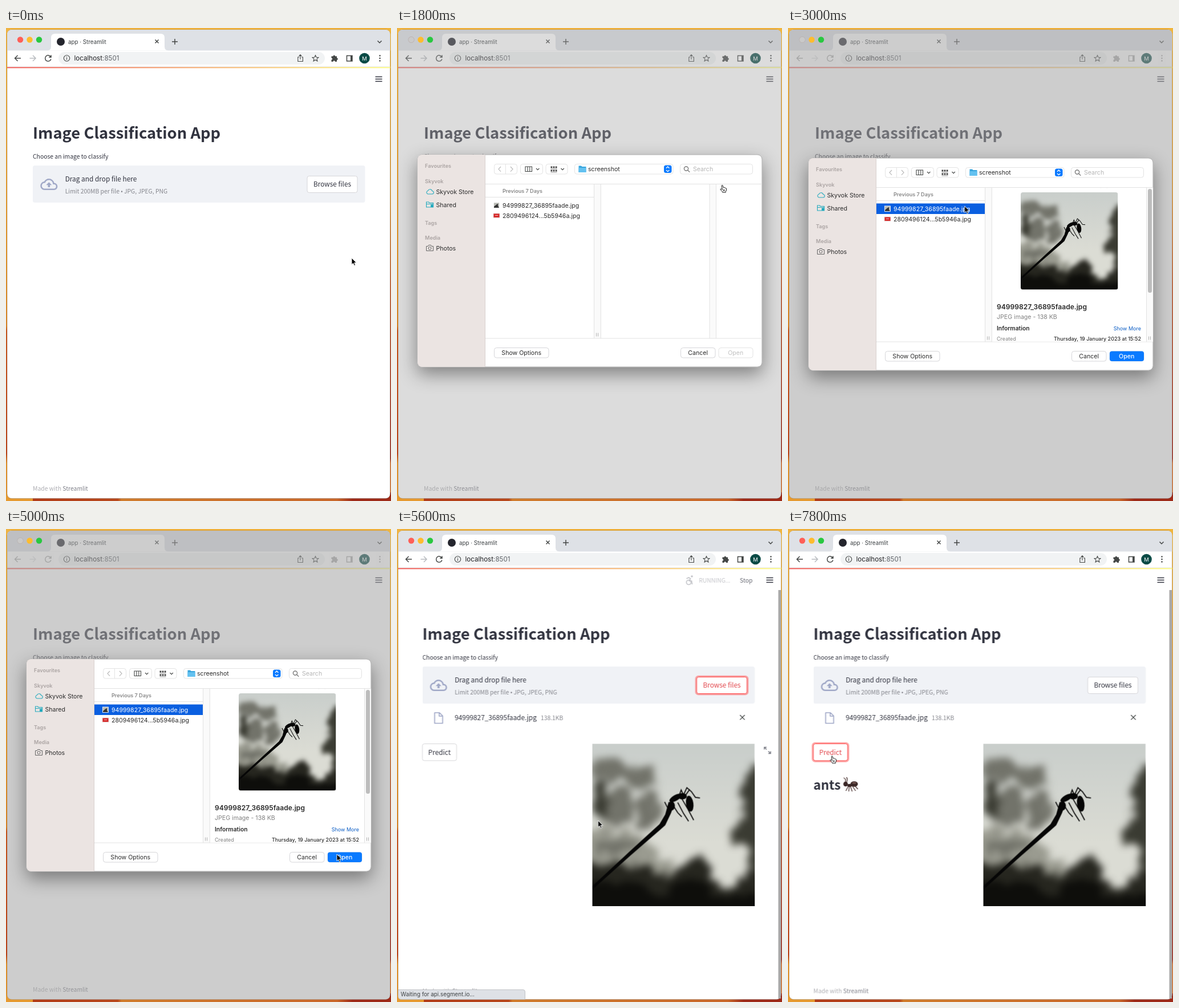
An HTML page that plays this animation: 675x829 px, repeating every 8000 ms.

```html
<!DOCTYPE html>
<html lang="en">
<head>
<meta charset="utf-8">
<title>Image Classification App</title>
<style>
html, body { margin: 0; width: 100%; height: 100%; overflow: hidden; }
svg.stage { display: block; width: 675px; height: 829px; }
text { font: 10.6px Inter, sans-serif; fill: #2b2b2b; }
.page text { font: 11.83px "Noto Sans CJK JP", "Noto Sans CJK SC", "Noto Sans CJK", sans-serif; fill: #31333f; }
.page .small { font-size: 10.35px; }
.page .grey { fill: #84858c; }
.page .pale { fill: #adadb2; }
.page .title { font-size: 27.35px; font-weight: 700; }
.page .result { font-size: 22.4px; font-weight: 700; }
.mid { text-anchor: middle; }
.end { text-anchor: end; }
.line { fill: none; stroke: #444746; stroke-width: 1.5; }
.btn { fill: #fff; stroke: #d6d6d9; }
.red .btn { stroke: #ff4b4b; }
.page .red text { fill: #e2444a; }
.ring { fill: none; stroke: #ff4b4b; stroke-opacity: .5; stroke-width: 2.6; }
.head { font-size: 9.1px; font-weight: 600; fill: #aaa3a2; }
.tiny { font-size: 9px; }
.box { fill: #fff; stroke: #dcdcdc; stroke-width: .8; }
.rule { stroke: #e2e2e2; fill: none; }
.teal { fill: none; stroke: #22a9bd; stroke-width: 1.1; }

/* 2.5% is one 200 ms step */
.dim, .dim2, .dialog, .preview, .uploaded, .expand, .hover, .focus, .predict-hover, .predict-focus,
.running, .status, .ants, .hand { opacity: 0; }
.dim, .dim2, .dialog, .sheet, .preview, .page, .uploaded, .expand, .footer, .hover, .focus, .predict-hover,
.predict-focus, .running, .status, .ants, .hand, .arrow, .cursor { animation: 8s step-end infinite; }
.dim { animation-name: dim; }
.dim2 { animation-name: dim2; }
.dialog { animation-name: dialog; }
.sheet { animation-name: sheet; }
.preview { animation-name: preview; }
.page { animation-name: page; }
.uploaded { animation-name: uploaded; }
.expand { animation-name: expand; }
.footer { animation-name: footer; }
.hover { animation-name: hover; }
.focus { animation-name: focus; }
.predict-hover { animation-name: predict-hover; }
.predict-focus { animation-name: predict-focus; }
.running { animation-name: running; }
.status { animation-name: status; }
.ants { animation-name: ants; }
.hand { animation-name: hand; }
.arrow { animation-name: arrow; }
.cursor { animation-name: cursor; }
@keyframes dim { 22.5% { opacity: 1 } 25% { opacity: 0 } }
@keyframes dim2 { 25% { opacity: 1 } 65% { opacity: 0 } }
@keyframes dialog { 22.5% { opacity: 1 } 65% { opacity: 0 } }
@keyframes sheet { 25% { transform: translate(0, 6px) } 65% { transform: none } }
@keyframes preview { 35% { opacity: 1 } 65% { opacity: 0 } }
@keyframes page { 67.5%, 100% { transform: translate(-2.5px, 0) } }
@keyframes uploaded { 67.5%, 100% { opacity: 1 } }
@keyframes expand { 67.5% { opacity: 1 } 72.5% { opacity: 0 } }
@keyframes footer { 67.5%, 100% { transform: translate(0, 2.5px) } }
@keyframes hover { 12.5% { opacity: 1 } 87.5% { opacity: 0 } }
@keyframes focus { 20% { opacity: 1 } 87.5% { opacity: 0 } }
@keyframes predict-hover { 77.5%, 100% { opacity: 1 } }
@keyframes predict-focus { 87.5%, 100% { opacity: 1 } }
@keyframes running { 67.5% { opacity: 1 } 75% { opacity: 0 } 87.5% { opacity: 1 } 92.5% { opacity: 0 } }
@keyframes status { 67.5% { opacity: 1 } 77.5% { opacity: 0 } }
@keyframes ants { 92.5%, 100% { opacity: 1 } }
@keyframes hand { 12.5% { opacity: 1 } 27.5% { opacity: 0 } 77.5%, 100% { opacity: 1 } }
@keyframes arrow { 12.5% { opacity: 0 } 27.5% { opacity: 1 } 77.5%, 100% { opacity: 0 } }
@keyframes cursor {
  0% { transform: translate(606px, 403px) }
  7.5% { transform: translate(598px, 372px) }
  10% { transform: translate(582px, 315px) }
  12.5% { transform: translate(571px, 278px) }
  15% { transform: translate(570px, 275px) }
  27.5% { transform: translate(530px, 285px) }
  30% { transform: translate(420px, 303px) }
  32.5% { transform: translate(325px, 314px) }
  35% { transform: translate(309.5px, 312px) }
  47.5% { transform: translate(330px, 340px) }
  50% { transform: translate(400px, 420px) }
  52.5% { transform: translate(490px, 510px) }
  55% { transform: translate(555px, 560px) }
  57.5% { transform: translate(580px, 570px) }
  67.5% { transform: translate(480px, 545px) }
  70% { transform: translate(352.5px, 511px) }
  72.5% { transform: translate(230px, 455px) }
  75% { transform: translate(130px, 410px) }
  77.5% { transform: translate(85px, 399px) }
  80%, 100% { transform: translate(77px, 397.5px) }
}
</style>
</head>
<body>
<svg class="stage" viewBox="0 0 675 829">
<defs>
  <linearGradient id="left" x2="0" y2="1">
    <stop stop-color="#efb443"/><stop offset=".46" stop-color="#e89a2c"/><stop offset=".63" stop-color="#e08a28"/>
    <stop offset=".64" stop-color="#cf5a1e"/><stop offset=".9" stop-color="#c2461a"/><stop offset=".92" stop-color="#e8962c"/>
  </linearGradient>
  <linearGradient id="right" x2="0" y2="1">
    <stop stop-color="#f0b63e"/><stop offset=".35" stop-color="#e49a30"/><stop offset=".55" stop-color="#c4511f"/>
    <stop offset=".91" stop-color="#9c2416"/><stop offset=".92" stop-color="#d9702a"/>
  </linearGradient>
  <linearGradient id="bottom">
    <stop offset=".07" stop-color="#e69a30"/><stop offset=".07" stop-color="#b23c18"/><stop offset=".29" stop-color="#b8481c"/>
    <stop offset=".3" stop-color="#d07c2c"/><stop offset=".86" stop-color="#c9672a"/><stop offset=".9" stop-color="#9e2a18"/>
  </linearGradient>
  <linearGradient id="accent"><stop stop-color="#f0524f"/><stop offset="1" stop-color="#fffd80"/></linearGradient>
  <linearGradient id="sky" x2="0" y2="1"><stop stop-color="#c9cecb"/><stop offset=".6" stop-color="#dbdcd4"/></linearGradient>
  <filter id="foliage" x="-20%" y="-20%" width="140%" height="140%" color-interpolation-filters="sRGB">
    <feTurbulence baseFrequency=".03" numOctaves="2" seed="4" result="noise"/>
    <feDisplacementMap in="SourceGraphic" in2="noise" scale="36" xChannelSelector="R" yChannelSelector="G"/>
    <feGaussianBlur stdDeviation="7"/>
  </filter>
  <filter id="shadow" x="-20%" y="-20%" width="140%" height="150%"><feDropShadow dx="0" dy="12" stdDeviation="16" flood-opacity=".42"/></filter>
  <clipPath id="round"><rect x="408" y="282" width="170.5" height="170.5" rx="4"/></clipPath>
  <clipPath id="sheetClip"><rect x="36" y="222" width="604" height="372" rx="8"/></clipPath>
  <symbol id="photo" viewBox="0 0 285 285">
    <rect width="285" height="285" fill="url(#sky)"/>
    <g filter="url(#foliage)">
      <path d="M-30 140L20 150 60 140 90 165 110 190 140 200 150 240H-30Z" fill="#9a9b90"/>
      <g fill="#72736a">
        <ellipse cx="18" cy="35" rx="34" ry="24"/><ellipse cx="75" cy="48" rx="34" ry="22"/>
        <ellipse cx="30" cy="105" rx="34" ry="34"/><ellipse cx="88" cy="108" rx="22" ry="30"/>
        <ellipse cx="30" cy="172" rx="36" ry="14"/>
      </g>
      <g fill="#3a3b32">
        <ellipse cx="276" cy="80" rx="24" ry="54"/><ellipse cx="270" cy="142" rx="30" ry="34"/>
        <ellipse cx="4" cy="92" rx="14" ry="32"/><ellipse cx="280" cy="190" rx="18" ry="30"/>
      </g>
      <path d="M-30 190L35 205 75 205 115 222 142 218 158 200 175 182 190 196 202 222 228 245 246 236 260 214 315 205V315H-30Z" fill="#26261f"/>
      <path d="M-30 238L60 238 120 255 170 225 205 258 315 250V315H-30Z" fill="#0e0e0b"/>
    </g>
    <path d="M0 250L67 187.500 118 141 128 124 134 102 144 106 138 122 128 143 119 151 67 196 0 256Z" fill="#060606"/>
    <g fill="#060606">
      <ellipse cx="146" cy="95" rx="12" ry="5" transform="rotate(-30 146 95)"/>
      <ellipse cx="158" cy="92" rx="8" ry="5.500"/><ellipse cx="171" cy="105" rx="6.500" ry="14" transform="rotate(-8 171 105)"/>
      <ellipse cx="139" cy="109" rx="6" ry="8"/>
    </g>
    <path d="M152 92L156 81 160 90M160 90L166 77 174 84 181 94 189 95M164 90L171 80M132 112L127 102M150 103L160 122 169 136M157 96L168 115 178 134M143 110L150 121 157 128" fill="none" stroke="#060606" stroke-width="1.700"/>
  </symbol>
</defs>

<rect width="675" height="829" fill="#efb240"/>
<rect width="5" height="829" fill="url(#left)"/>
<rect x="668" width="7" height="829" fill="url(#right)"/>
<rect y="814" width="675" height="15" fill="url(#bottom)"/>
<rect x="2" y="3" width="671.5" height="821.5" rx="8" fill="#fff" stroke="#000" stroke-opacity=".2"/>

<!-- browser bar -->
<path d="M2 39.5V11a8 8 0 0 1 8-8H665.5a8 8 0 0 1 8 8V39.5Z" fill="#dee1e6"/>
<path d="M72 39.5q7 0 7-7V17q0-7 7-7H271q7 0 7 7V32.5q0 7 7 7Z" fill="#fff"/>
<circle cx="25" cy="20.5" r="5.2" fill="#ff5f57"/>
<circle cx="96" cy="24" r="7" fill="#24252d"/>
<text x="109" y="27.5" style="font-size:9.8px;fill:#3c4043">app · Streamlit</text>
<rect x="92" y="42" width="467" height="22" rx="11" fill="#f1f3f4"/>
<text x="119.5" y="57" style="font-size:11.6px;fill:#202124">localhost<tspan fill="#5f6368">:8501</tspan></text>
<g class="line">
  <path d="M261.5 20.5l6 6m0-6l-6 6M291 24h10m-5-5v10M651.5 22.5l3.5 3.5 3.5-3.5M26 53H15.5m5-5l-5 5 5 5"/>
  <path d="M41.5 53H52m-5-5l5 5-5 5" stroke="#b9bcc0"/>
  <path d="M78.3 50.3a5.2 5.2 0 1 0 .6 4.2M79 47.5v3.8h-3.8"/>
  <g stroke-width="1.1">
    <circle cx="106.5" cy="53" r="5.2"/><path d="M106.5 52.2v3.5m0-5.7v1.2"/>
    <path d="M514 51h-2.2v7.5h8.6V51h-2.2M516 55v-8m-2.5 2.3L516 46.8l2.5 2.5"/>
    <path d="M542.5 47.8l1.6 3.5 3.8.4-2.9 2.5.9 3.8-3.4-2-3.4 2 .9-3.8-2.9-2.5 3.8-.4Z"/>
  </g>
  <path d="M597.5 48.5h9.5v9.5h-9.5Z"/>
</g>
<path d="M604 48.5h3V58h-3ZM570.5 49.5h3a1.8 1.8 0 1 1 3.6 0h3v3a1.8 1.8 0 1 1 0 3.6v2.9h-3.2a1.7 1.7 0 1 0-3.4 0h-3V55.8a1.7 1.7 0 1 0 0-3.4Z" fill="#444746"/>
<circle cx="628.5" cy="53" r="9.3" fill="#0a4b46"/>
<text class="mid" x="628.5" y="56.5" style="font-size:9.5px;fill:#fff">M</text>
<g fill="#444746"><circle cx="655.5" cy="48.5" r="1.3"/><circle cx="655.5" cy="53" r="1.3"/><circle cx="655.5" cy="57.5" r="1.3"/></g>
<rect x="2" y="67.5" width="671.5" height="1" fill="#dcdfe3"/>
<rect x="2" y="68.5" width="671.5" height="1.8" fill="url(#accent)"/>
<path class="line" d="M647.5 85.5h12m-12 4h12m-12 4h12" style="stroke:#31333f"/>

<!-- app -->
<g class="page">
  <text class="title" x="47" y="194">Image Classification App</text>
  <text class="small" x="47" y="228.5">Choose an image to classify</text>
  <rect x="47" y="241" width="582.5" height="65" rx="3.5" fill="#f0f2f6"/>
  <path transform="translate(60.3 259) scale(1.25)" fill="#a0a8c7" d="M19.35 10.04A7.49 7.49 0 0 0 12 4C9.11 4 6.6 5.64 5.35 8.04A5.994 5.994 0 0 0 0 14c0 3.31 2.69 6 6 6h13c2.76 0 5-2.24 5-5 0-2.64-2.05-4.78-4.65-4.96zM19 18H6c-2.21 0-4-1.79-4-4 0-2.05 1.53-3.76 3.56-3.97l1.07-.11.5-.95A5.469 5.469 0 0 1 12 6c2.62 0 4.88 1.86 5.39 4.43l.3 1.5 1.53.11A2.98 2.98 0 0 1 22 15c0 1.65-1.35 3-3 3zM8 13h2.55v3h2.9v-3H16l-4-4z"/>
  <text x="103.7" y="269.3">Drag and drop file here</text>
  <text class="small grey" x="103.7" y="290">Limit 200MB per file • JPG, JPEG, PNG</text>
  <rect class="btn" x="528" y="259.5" width="88" height="29" rx="3.5"/>
  <text class="mid" x="572" y="278">Browse files</text>
  <g class="hover red">
    <rect class="btn" x="528" y="259.5" width="88" height="29" rx="3.5"/>
    <text class="mid" x="572" y="278">Browse files</text>
  </g>
  <rect class="ring focus" x="526.5" y="258" width="91" height="32" rx="4.5"/>

  <g class="uploaded">
    <path d="M68.5 322h8.5l5.5 5.5V340.5h-14ZM76.5 322v6h6" fill="none" stroke="#a0a8c7" stroke-width="1.7" stroke-linejoin="round"/>
    <text x="103.7" y="335.3">94999827_36895faade.jpg</text>
    <text class="small grey" x="254.5" y="335.3">138.1KB</text>
    <path class="line" d="M603.8 326l8.4 8.4m0-8.4l-8.4 8.4" style="stroke-width:1.3"/>
    <rect class="btn" x="47" y="376.5" width="60" height="29.5" rx="3.5"/>
    <text class="mid" x="77" y="395.5">Predict</text>
    <g class="predict-hover red">
      <rect class="btn" x="47" y="376.5" width="60" height="29.5" rx="3.5"/>
      <text class="mid" x="77" y="395.5">Predict</text>
    </g>
    <rect class="ring predict-focus" x="45.5" y="375" width="63" height="32.5" rx="4.5"/>
    <use href="#photo" x="345" y="376.5" width="284.5" height="284.5"/>
  </g>
  <path class="expand" d="M650.5 386.5l-4-4m0 4v-4h4M653.5 389.5l4 4m0-4v4h-4" fill="none" stroke="#777983" stroke-width="1.5"/>
  <g class="ants">
    <text class="result" x="47" y="456.5">ants</text>
    <g fill="#3a2726">
      <ellipse cx="118.5" cy="447" rx="6.5" ry="4.8"/><ellipse cx="110.5" cy="449.5" rx="4" ry="2.8"/><ellipse cx="103.5" cy="447" rx="4" ry="4.3"/>
      <path d="M103 444q2-6-3-8M105 444q3-5 0-9M108 451l-4 8m6-8l-1 9m3-9l3 9m0-10l6 9m-3-11l7 8" fill="none" stroke="#4a3330" stroke-width="1.3"/>
    </g>
    <ellipse cx="118.5" cy="445" rx="3.5" ry="1.3" fill="#7a5a55"/>
  </g>
  <g class="footer"><text class="small pale" x="47" y="811">Made with <tspan fill="#7e7f88">Streamlit</tspan></text></g>
  <g class="running">
    <g fill="none" stroke="#c3c4c9" stroke-width="1.7"><circle cx="514" cy="93.5" r="4"/><path d="M510 87l4-2 3 2-2 4h4l1 6"/></g>
    <circle cx="519.5" cy="83" r="1.8" fill="#c3c4c9"/>
    <text class="small" x="531.7" y="93.5" style="fill:#c3c4c9">RUNNING...</text>
    <text class="small" x="603.5" y="93.5" style="fill:#686a73">Stop</text>
  </g>
</g>
<rect class="uploaded" x="668.5" y="107" width="4.5" height="716" fill="#a9a9a9"/>
<g class="status">
  <path d="M2 807.5H221q3.5 0 3.5 3.5V824.5H8q-6 0-6-6Z" fill="#dee1e6" stroke="#b5b8bc" stroke-width=".8"/>
  <text x="6.5" y="819" style="font-size:9.8px;fill:#3c4043">Waiting for api.segment.io...</text>
</g>

<rect class="dim" x="2" y="3" width="671.5" height="821.5" rx="8" fill="#a8a8a8" fill-opacity=".4"/>
<g class="dim2">
  <rect x="2" y="3" width="671.5" height="821.5" rx="8" fill="#a4a4a4" fill-opacity=".55"/>
  <path d="M10 42H85V64H10ZM567 42h44V64h-44ZM649 42h13V64h-13Z" fill="#cdcdcd" fill-opacity=".55"/>
</g>
<circle class="dialog" cx="25" cy="20.5" r="5.2" fill="#c9c9c9" stroke="#b3b3b3" stroke-width=".7"/>
<circle cx="41.5" cy="20.5" r="5.2" fill="#febc2e"/>
<circle cx="58" cy="20.5" r="5.2" fill="#28c840"/>

<!-- file dialog -->
<g class="dialog"><g class="sheet">
  <rect x="36" y="222" width="604" height="372" rx="8" fill="#fff" stroke="#a9a9a9" filter="url(#shadow)"/>
  <g clip-path="url(#sheetClip)"><rect x="36" y="222" width="118.5" height="372" fill="#ebe4e2"/></g>
  <path d="M154.5 222V594" stroke="#d8d1cf"/>
  <text class="head" x="49" y="245">Favourites</text>
  <text class="head" x="49" y="271.5">Skyvok</text>
  <text class="head" x="49" y="344.5">Tags</text>
  <text class="head" x="49" y="371">Media</text>
  <text x="68.5" y="290.5">Skyvok Store</text>
  <text x="68.5" y="313.5">Shared</text>
  <text x="68.5" y="389.7">Photos</text>
  <path class="teal" d="M54 291h7.5a2.6 2.6 0 0 0 .3-5.2 4 4 0 0 0-7.6-.6A3 3 0 0 0 54 291ZM51.5 314V305h4l1.5 1.5h6.5V314ZM51.5 308.5h12"/>
  <path d="M59 309.5h4.5V314H59Z" fill="#22a9bd"/>
  <g class="line" style="stroke-width:1;stroke:#666"><path d="M51.5 382.5h3l1-2h4l1 2h3v8h-12Z"/><circle cx="57.5" cy="386" r="2.5"/></g>

  <g class="box">
    <rect x="170.5" y="238.5" width="40" height="17.5" rx="4"/><path d="M190.5 239v17"/>
    <rect x="216.5" y="238.5" width="39" height="17.5" rx="4"/><rect x="261" y="238.5" width="38" height="17.5" rx="4"/>
    <rect x="311.5" y="238.5" width="172.5" height="17.5" rx="4"/><rect x="496.5" y="238.5" width="127" height="17.5" rx="4"/>
  </g>
  <path d="M182 243l-4 4.3 4 4.3M199 243l4 4.3-4 4.3" fill="none" stroke="#b9b9b9" stroke-width="1.2"/>
  <path class="line" style="stroke-width:1.1" d="M225 243h11.5v8.5H225Zm4 0v8.5m3.8-8.5v8.5M244 246l2.7 2.7 2.7-2.7M287.5 246l2.7 2.7 2.7-2.7"/>
  <path d="M269.5 244h11m-11 6h11" stroke="#444" stroke-width="3" stroke-dasharray="2.8 1.3"/>
  <path d="M269.5 247h11m-11 6h11" stroke="#999" stroke-width="1"/>
  <path d="M318.5 241.5h4.5l1.5 1.5h7V253h-13Z" fill="#38a5dd"/><path d="M318.5 245h13v8h-13Z" fill="#63c1f0"/>
  <text x="335" y="251">screenshot</text>
  <rect x="468" y="240.5" width="13.5" height="13.5" rx="3.5" fill="#0a7aff"/>
  <path d="M472 245.7l2.7-2.7 2.7 2.7M472 249l2.7 2.7 2.7-2.7" fill="none" stroke="#fff" stroke-width="1.3"/>
  <g class="line" style="stroke-width:1.2;stroke:#666"><circle cx="507" cy="246.5" r="3.6"/><path d="M509.7 249.2l3.5 3.5"/></g>
  <text x="519" y="251" style="fill:#b5b5b5">Search</text>

  <path d="M346 274h11V544h-11ZM548 274h11.5V544H548Z" fill="#fafafa"/>
  <path class="rule" d="M155 273.5H640M155 544H640M155 296.5H345.5M345.5 274V544M357.3 274V544M548 274V544M559.5 274V544"/>
  <path d="M349.5 534.5v6m3-6v6" stroke="#aaa" stroke-width=".9"/>
  <text class="head" x="185" y="289" style="fill:#888">Previous 7 Days</text>
  <text x="185" y="314.5">94999827_36895faade.jpg</text>
  <text x="185" y="332.7">2809496124...5b5946a.jpg</text>
  <rect class="btn" x="170.5" y="560.5" width="95.5" height="17.5" rx="4"/><text class="mid" x="218.2" y="573">Show Options</text>
  <rect class="btn" x="497.5" y="560.5" width="60.5" height="17.5" rx="4"/><text class="mid" x="527.7" y="573">Cancel</text>
  <rect class="box" x="564" y="560.5" width="60" height="17.5" rx="4"/><text class="mid" x="593.7" y="573" style="fill:#c0c0c0">Open</text>

  <g class="preview">
    <rect x="155" y="301.5" width="190" height="18.5" fill="#0a5fe0"/>
    <text x="185" y="314.5" style="fill:#fff">94999827_36895faade.jpg</text>
    <rect x="358" y="274.5" width="282" height="269" fill="#fff"/>
    <rect x="629" y="274.5" width="11" height="269" fill="#fafafa"/>
    <path class="rule" d="M628.5 274V544"/>
    <rect x="631" y="276" width="7" height="182" rx="3.5" fill="#bdbdbd"/>
    <path d="M632.5 534.5v6m3-6v6" stroke="#aaa" stroke-width=".9"/>
    <g clip-path="url(#round)"><use href="#photo" x="408" y="282" width="170.5" height="170.5"/></g>
    <text x="366" y="487" style="font-size:12.1px;font-weight:600">94999827_36895faade.jpg</text>
    <text x="366" y="504" style="fill:#808080">JPEG image - 138 KB</text>
    <text x="366" y="523.5" style="font-size:10.3px;font-weight:600">Information</text>
    <text class="tiny end" x="619" y="523.5" style="fill:#0a5cc4">Show More</text>
    <text class="tiny" x="366" y="541.7" style="fill:#808080">Created</text>
    <text class="tiny end" x="619" y="541.7" style="font-weight:500">Thursday, 19 January 2023 at 15:52</text>
    <rect x="564" y="560.5" width="60" height="17.5" rx="4" fill="#0a7aff"/>
    <text class="mid" x="593.7" y="573" style="fill:#fff;font-weight:500">Open</text>
  </g>
  <rect x="169.5" y="306" width="10" height="9.5" fill="#b8bab4" stroke="#fff" stroke-width=".8"/>
  <path d="M170 313l5-4 2-1v4l2 3h-9Z" fill="#333"/>
  <rect x="169" y="325" width="11" height="7.5" fill="#d62b2b" stroke="#e6e6e6" stroke-width=".8"/>
  <path d="M172 328.5h5" stroke="#fff" stroke-opacity=".7"/>
</g></g>

<g class="cursor">
  <path class="arrow" d="M0 0V11.7L2.7 9.2 4.6 13.4 6.5 12.5 4.7 8.4H8.3Z" stroke="#fff" stroke-width=".9"/>
  <path class="hand" d="M-.8 1.2Q0-.6 1.2 1.2L2.2 4.6Q3.5 3.8 4 5 5.4 4.3 5.9 5.6 7.5 5.4 7.6 7.2L7.3 10 6.3 11.5V13H.8L.2 11.6-3 8.2Q-3.2 6.6-1.6 7L.3 8.2ZM2.3 8v2.8m1.8-2.8v2.8" fill="#fff" stroke="#111" stroke-width="1"/>
</g>
</svg>
</body>
</html>
```
